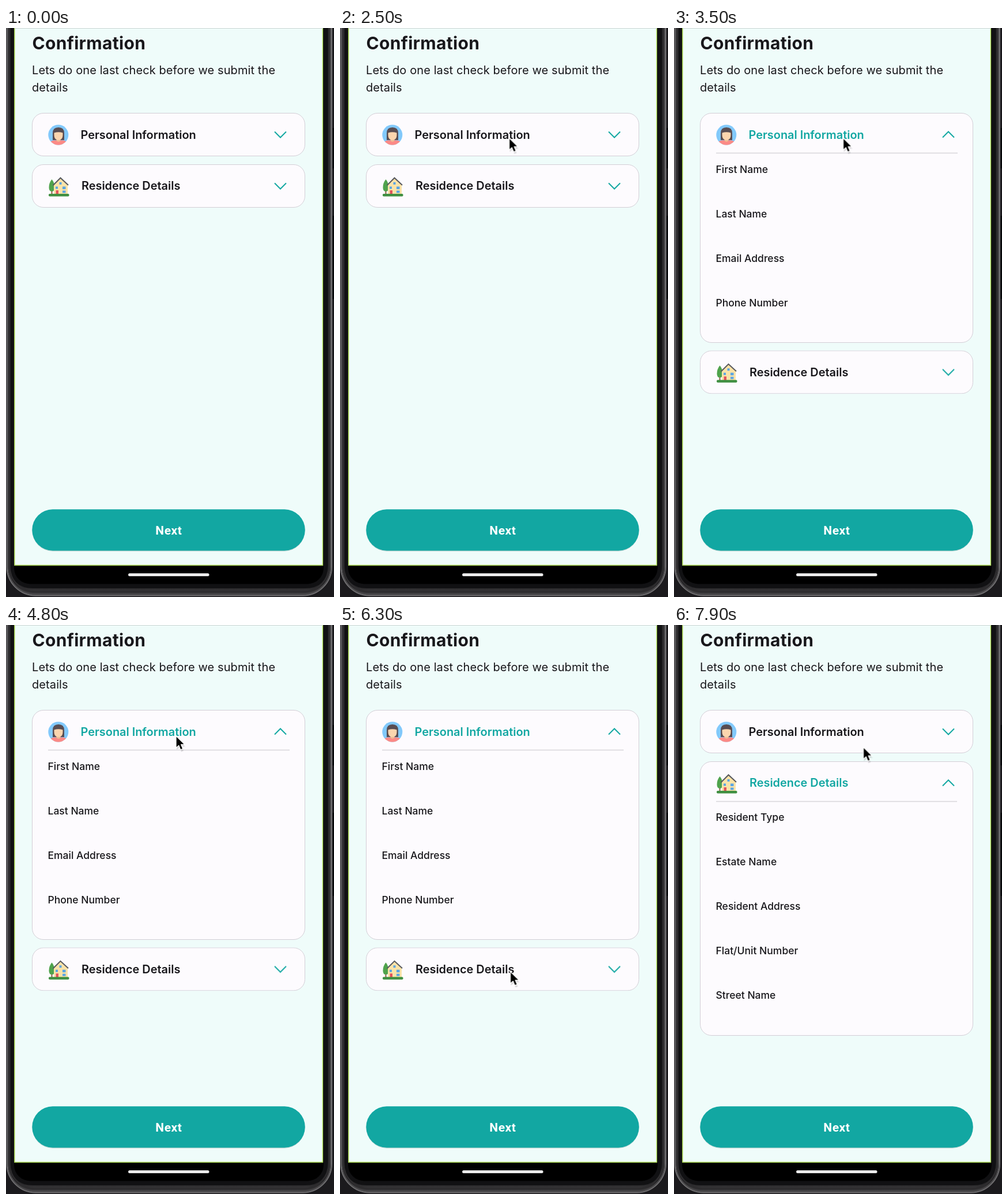
An HTML page for the animation above (8 s loop, 569 px wide and 985 px high).

```html
<!DOCTYPE html>
<html lang="en">
<head>
<meta charset="utf-8">
<title>Confirmation</title>
<style>
  :root { --teal: #12a7a2; --ink: #18171b; --loop: 8s infinite; }
  html, body { margin: 0; width: 100%; height: 100%; overflow: hidden; background: #1b1a1d; }
  .stage { position: relative; width: 569px; height: 985px; overflow: hidden; }
  svg { position: absolute; left: 0; top: 0; display: block; }
  text { font-family: Inter, sans-serif; font-optical-sizing: none; fill: var(--ink); }

  .title { font-size: 30px; font-weight: 700; letter-spacing: .3px; }
  .intro { font-size: 20px; font-weight: 400; letter-spacing: .1px; }
  .head { font-size: 19.9px; font-weight: 600; }
  .rows { font-size: 17.5px; font-weight: 450; opacity: 0; }
  .next { font: 700 21px Roboto, sans-serif; letter-spacing: .5px; fill: #fff; text-anchor: middle; }

  .card {
    position: absolute; left: 45px; width: 474px; height: 75px;
    box-sizing: border-box; overflow: hidden;
    background: #fdfbfe; border: 1px solid #d3ced6; border-radius: 20px;
  }
  .card svg { left: -1px; top: -1px; }
  .rule { stroke: #d8d5da; stroke-width: 1.3; }
  .arrow {
    fill: none; stroke: var(--teal); stroke-width: 2;
    transform-box: fill-box; transform-origin: center;
  }

  .person { top: 147px; animation: personSize var(--loop) ease-in-out; }
  .person .head { animation: personInk var(--loop) step-end; }
  .person .rows { animation: personRows var(--loop) step-end; }
  .person .arrow { animation: personArrow var(--loop) ease-in-out; }

  .home { top: 236px; animation: homeSize var(--loop) ease-in-out, homeShift var(--loop) ease-in-out; }
  .home .head { animation: homeInk var(--loop) step-end; }
  .home .rows { animation: homeRows var(--loop) step-end; }
  .home .arrow { animation: homeArrow var(--loop) ease-in-out; }

  .cursor { animation: move var(--loop) ease-in-out, show var(--loop) step-end; }

  @keyframes personSize { 0%, 35% { height: 75px } 38.75%, 80% { height: 398px } 83.75%, 100% { height: 75px } }
  @keyframes personInk { 0% { fill: var(--ink) } 35% { fill: var(--teal) } 80%, 100% { fill: var(--ink) } }
  @keyframes personRows { 0% { opacity: 0 } 35% { opacity: 1 } 83.75%, 100% { opacity: 0 } }
  @keyframes personArrow { 0%, 35% { transform: none } 38.75%, 80% { transform: rotate(180deg) } 83.75%, 100% { transform: none } }

  @keyframes homeSize { 0%, 80% { height: 75px } 83.75%, 100% { height: 474.5px } }
  @keyframes homeShift { 0%, 35% { transform: none } 38.75%, 80% { transform: translateY(322.3px) } 83.75%, 100% { transform: none } }
  @keyframes homeInk { 0% { fill: var(--ink) } 80%, 100% { fill: var(--teal) } }
  @keyframes homeRows { 0% { opacity: 0 } 80%, 100% { opacity: 1 } }
  @keyframes homeArrow { 0%, 80% { transform: none } 83.75%, 100% { transform: rotate(180deg) } }

  @keyframes show { 0% { opacity: 0 } 6.25%, 100% { opacity: 1 } }
  @keyframes move {
    0%, 6.25% { transform: translate(318px, 400px) }
    17.5%, 44% { transform: translate(293.5px, 190.5px) }
    60%, 63.75% { transform: translate(295px, 192px) }
    72.5%, 80% { transform: translate(295.5px, 600px) }
    87.5%, 90% { transform: translate(295px, 599px) }
    97.5%, 100% { transform: translate(328.5px, 211.5px) }
  }
</style>
</head>
<body>
<div class="stage">
  <svg width="569" height="985">
    <defs>
      <linearGradient id="base" x1="0" x2="0" y1="0" y2="1">
        <stop offset=".98" stop-color="#1b1a1c"/>
        <stop offset="1" stop-color="#454446"/>
      </linearGradient>
    </defs>
    <!-- phone body -->
    <g fill="#0a0a0c">
      <rect x="566.5" y="173" width="3" height="70"/>
      <rect x="566.5" y="325" width="3" height="144"/>
    </g>
    <g stroke-width="2">
      <rect x="1.5" y="-80" width="563.5" height="1062.5" rx="50" fill="url(#base)" stroke="#727173"/>
      <rect x="3.5" y="-80" width="559.5" height="1060.5" rx="48" fill="none" stroke="#4a494b"/>
      <rect x="6" y="-80" width="554.5" height="1056" rx="45" fill="none" stroke="#2d2c2e" stroke-width="3"/>
    </g>
    <path d="M8 0H558V930q0 40-40 40H48q-40 0-40-40z" fill="#111113"/>
    <rect x="14" y="-80" width="537" height="1042.5" rx="28"/>
    <!-- screen -->
    <rect x="14.900" y="-5" width="534.500" height="935" fill="#effcfa" stroke="#b2e05c" stroke-width="1.500"/>
    <path d="M15 .5H550" stroke="#cbd5d3"/>
    <rect x="212" y="944" width="140.500" height="5" rx="2.500" fill="#ebebeb"/>

    <text class="title" x="45.500" y="36.600">Confirmation</text>
    <text class="intro"><tspan x="45" y="79.500">Lets do one last check before we submit the</tspan><tspan x="45" y="109.500">details</tspan></text>

    <rect x="45.500" y="834" width="473" height="72" rx="36" fill="#bfd6d4"/>
    <rect x="45.300" y="833.300" width="473.500" height="71.500" rx="35.700" fill="#12a7a2"/>
    <text class="next" x="282.300" y="876.500">Next</text>
  </svg>

  <div class="card person">
    <svg width="474" height="480" viewBox="45 147 474 480">
      <clipPath id="disc"><circle cx="90.800" cy="185" r="17.500"/></clipPath>
      <g clip-path="url(#disc)">
        <rect x="73" y="167" width="36" height="36" fill="#82c9fb"/>
        <path d="M81 194V182q0-10 10-10t10 10v12z" fill="#584d52"/>
        <path d="M76 203v-2q0-6 8-6.500h14q8 .5 8 6.500v2z" fill="#fc8a86"/>
        <path d="M87.500 191h7v4q-3.500 4-7 0z" fill="#eebd94"/>
        <path d="M83.500 181.500q7.500-2.500 15 0v4q0 8-7.500 8.500-7.500-.5-7.500-8.500z" fill="#fbd5ae"/>
      </g>
      <text class="head" x="129.500" y="191.500">Personal Information</text>
      <path class="arrow" d="M466 179.500l10 10 10-10"/>
      <g class="rows">
        <path class="rule" d="M73 216.500H492"/>
        <text x="72.500" y="250.500">First Name</text>
        <text x="72.500" y="327.500">Last Name</text>
        <text x="72.500" y="404.500">Email Address</text>
        <text x="72.500" y="481.500">Phone Number</text>
      </g>
    </svg>
  </div>

  <div class="card home">
    <svg width="474" height="480" viewBox="45 236 474 480">
      <path d="M78.500 276h2v12h-2z" fill="#8a5a3c"/>
      <path d="M79.500 262q5 6 5 14 0 7-5 7t-5-7q0-8 5-14z" fill="#4fa34c"/>
      <path d="M83 288V272l11.500-12L107 271v17z" fill="#fae3a8"/>
      <path d="M81.500 272.500L94.500 259.500 108 272" fill="none" stroke="#58595f" stroke-width="2"/>
      <path d="M92.500 267h4v4h-4zM98 274.500h5.500v4.500H98zM86 274.500h4v4h-4zM98 281.500h5.500v4H98z" fill="#5aa5e4"/>
      <path d="M86.500 281h4.500v7.500h-4.500z" fill="#e2555c"/>
      <rect x="74" y="287" width="35.500" height="4.500" rx="1.800" fill="#3f8f41"/>
      <text class="head" x="131" y="280.300">Residence Details</text>
      <path class="arrow" d="M466 268.500l10 10 10-10"/>
      <g class="rows">
        <path class="rule" d="M73 305.500H491"/>
        <text x="72.500" y="339.300">Resident Type</text>
        <text x="72.500" y="416.300">Estate Name</text>
        <text x="72.500" y="493.300">Resident Address</text>
        <text x="72.500" y="570.300">Flat/Unit Number</text>
        <text x="72.500" y="647.300">Street Name</text>
      </g>
    </svg>
  </div>

  <svg width="569" height="985">
    <g class="cursor">
      <path d="M1 3v21l5-4 3 7.500 4-1.500-3-7.500h6z" fill="#000" opacity=".13"/>
      <path d="M0 0v20.800l4.700-4.400 3.100 7.500 4-1.600-3.100-7.400h6.300z" stroke="#fff" stroke-width="1.300" stroke-linejoin="round"/>
    </g>
  </svg>
</div>
</body>
</html>
```
